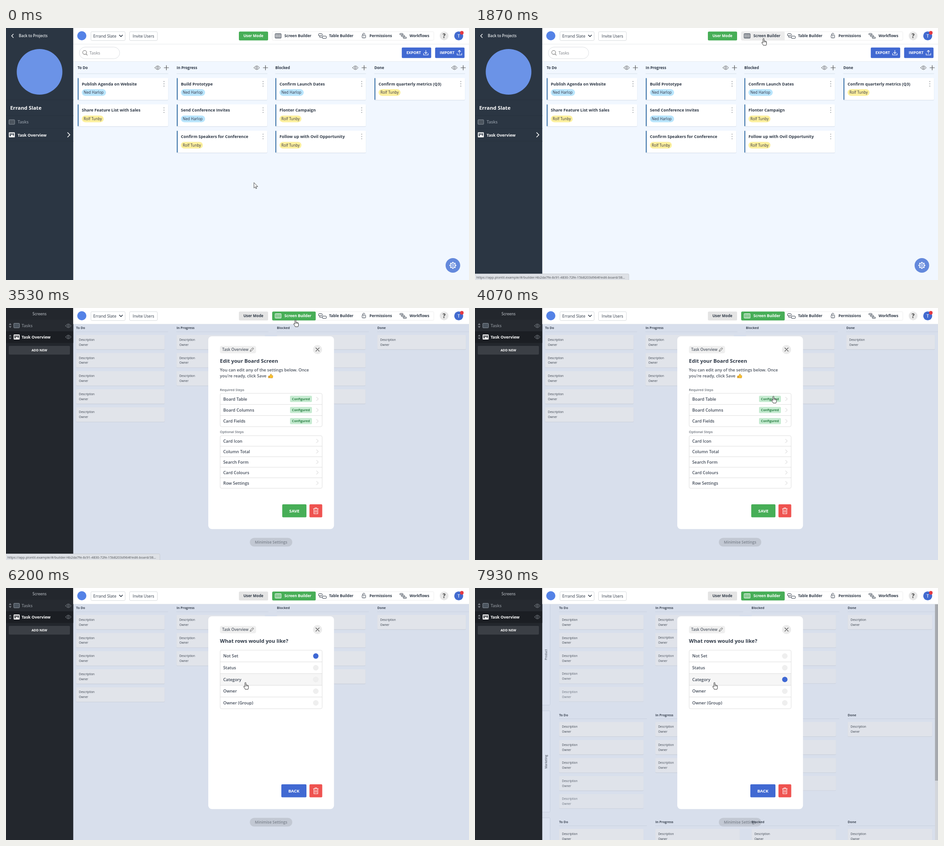
Animation of 1014 by 552 pixels, one loop 8 s. Source, as an HTML page:

```html
<!DOCTYPE html>
<html lang="en">
<head>
<meta charset="utf-8">
<title>Board screen settings</title>
<style>
html, body { margin: 0; width: 100%; height: 100%; overflow: hidden; background: #fff; }
svg { display: block; width: 1014px; height: 552px; font-family: "Open Sans", "Noto Sans", sans-serif; font-weight: 600; }
text { white-space: pre; }
</style>
</head>
<body>
<svg id="stage" viewBox="0 0 1014 552"></svg>
<script>
const LOOP = 8000, APP = 'Errand Slate';
const INK = '#2f3947', BLUE = '#4169d2', GREEN = '#47ae57';
const COLS = ['To Do', 'In Progress', 'Blocked', 'Done'];

// drawing helpers
const rect = (x, y, w, h, fill, r = 0, stroke = 'none', sw = 1) =>
  `<rect x="${x}" y="${y}" width="${w}" height="${h}" rx="${r}" fill="${fill}" stroke="${stroke}" stroke-width="${sw}"/>`;
const circle = (x, y, r, fill, stroke = 'none', sw = 1) =>
  `<circle cx="${x}" cy="${y}" r="${r}" fill="${fill}" stroke="${stroke}" stroke-width="${sw}"/>`;
const line = (d, color, w = 1, fill = 'none') =>
  `<path d="${d}" fill="${fill}" stroke="${color}" stroke-width="${w}" stroke-linecap="round" stroke-linejoin="round"/>`;
const text = (x, y, s, size, fill = INK, weight = 600, anchor = 'start') =>
  `<text x="${x}" y="${y}" font-size="${size}" fill="${fill}" font-weight="${weight}" text-anchor="${anchor}">${s}</text>`;
const group = (id, body) => `<g id="${id}">${body}</g>`;
const at = (x, y, body) => `<g transform="translate(${x} ${y})">${body}</g>`;
const fade = (opacity, body) => `<g opacity="${opacity}">${body}</g>`;
const times = (n, fn) => Array.from({ length: n }, (_, i) => fn(i)).join('');

// icons
const eye = (x, y, c) => at(x, y, line('M-6 0Q0-8.4 6 0Q0 8.4-6 0z', c, 1) + circle(0, 0, 2, 'none', c));
const plus = (x, y) => at(x, y, line('M-5 0H5M0-5V5', '#555', 1.2));
const chevron = (x, y, c, s = 1, w = 1) => at(x, y, line(`M${-s * 2} ${-s * 4}L${s * 2} 0L${-s * 2} ${s * 4}`, c, w));
const tableIcon = (x, y) => rect(x, y, 12.5, 10, '#4b545e', 1, '#87909a');
const boardIcon = (x, y, back) => rect(x, y, 13, 11, '#fff', 1) +
  rect(x + 2, y + 2, 2.2, 6.5, back) + rect(x + 5.4, y + 2, 2.2, 3.6, back) + rect(x + 8.8, y + 2, 2.2, 5.2, back);
const gridIcon = c => rect(589.5, 12.5, 13, 9.5, 'none', 1, c, 1.1) +
  line('M592.2 12.5v9.5M594.8 12.5v9.5M597.4 12.5v9.5M600 12.5v9.5', c, 1);
const tray = (x, up) => at(x, 54, line('M-5 1.5V5H5V1.5', '#fff', 1.1) +
  line(up ? 'M0 2V-5M-2.8-2.4L0-5 2.8-2.4' : 'M0-5V2M-2.8-.6L0 2 2.8-.6', '#fff', 1.1));

function header(build) {
  const c = build ? '#fff' : INK;
  return rect(147.3, 0, 866.7, 35, '#fff') + line('M148 35.3H1014', '#e4e6ea', .8) +
    circle(166, 17, 10, '#5482e6') +
    rect(186, 8, 75, 19.5, '#fff', 2.5, '#d4d7db', .9) + text(191, 21, APP, 8.96, INK, 500) +
    line('M248.5 15.5L251.8 19 255.1 15.5', INK, 1.6) +
    rect(270.5, 8, 61, 19.5, '#fff', 2.5, '#d4d7db', .9) + text(301, 21, 'Invite Users', 8.6, INK, 500, 'middle') +
    rect(510, 7.7, 64, 19.6, build ? '#e4e4e4' : GREEN, 2.5) +
    text(541.8, 20.4, 'User Mode', 8.2, build ? INK : '#fff', 700, 'middle') +
    rect(583, 8, 354, 19, '#fff', 2.5, '#ececec', .9) +
    (build ? rect(583, 7.7, 95.3, 19.6, GREEN, 2.5) : group('navHover', rect(583, 7.7, 95.3, 19.6, '#ececec', 2.5))) +
    gridIcon(c) + text(609.7, 20.4, 'Screen Builder', 8.2, c, 700) +
    rect(684.5, 12.5, 8, 4.5, 'none', 1, INK) + rect(693, 17.8, 8.5, 5, 'none', 1, INK) +
    line('M687 17v3.4h5.5', INK, .9) + text(707.5, 20.4, 'Table Builder', 8.2, INK, 700) +
    rect(780, 15.5, 7.6, 6.2, 'none', 1, INK) + line('M781.3 15.3v-1.6a2.4 2.4 0 0 1 4.7-.6M783.8 18v1.3', INK) +
    text(796, 20.4, 'Permissions', 8.2, INK, 700) +
    rect(862.5, 12, 7, 2.8, 'none', 1, INK) + rect(866, 16, 7, 2.8, 'none', 1, INK) + rect(870, 20, 7, 2.8, 'none', 1, INK) +
    text(883.7, 20.4, 'Workflows', 8.2, INK, 700) +
    circle(959.5, 17.3, 9.6, '#e7e7e7') + text(959.5, 22.2, '?', 13.5, '#444', 700, 'middle') +
    circle(991.5, 17.3, 9.8, '#426bd0') + text(991.5, 20.5, 'T', 8.6, '#fff', 600, 'middle') +
    circle(998.3, 10.5, 3.9, '#e33b43');
}

// user mode
const TAGS = { a: ['Ned Harlop', 53, '#b9e5fc'], b: ['Rolf Tunby', 48, '#fdf09e'] };
const TASKS = [
  [['Publish Agenda on Website', 'a'], ['Share Feature List with Sales', 'b']],
  [['Build Prototype', 'a'], ['Send Conference Invites', 'a'], ['Confirm Speakers for Conference', 'b']],
  [['Confirm Launch Dates', 'a'], ['Flonter Campaign', 'b'], ['Follow up with Ovil Opportunity', 'b']],
  [['Confirm quarterly metrics (Q3)', 'b']]
];

function taskCard([title, key], x, y) {
  const [name, w, color] = TAGS[key];
  return at(x, y,
    fade(.12, rect(0, .8, 198.3, 48.4, '#2c476b', 2)) +
    rect(0, 0, 198, 48, '#fff', 1.5) + rect(0, 0, 2, 48, '#3a72a8', 1) +
    text(9, 16, title, 8.96, INK, 700) +
    times(3, i => circle(189, 7.6 + i * 5, 1.2, '#b3b6ba')) +
    rect(9, 24.4, w, 14.7, color, 7.4) + text(13, 34.7, name, 8.2, '#334', 400));
}

function userView() {
  const back = '#2b3643';
  const side = rect(0, 0, 147.3, 552, back) + line('M16 13.5L12.3 17.3 16 21', '#fff', 1.3) +
    text(28, 20.3, 'Back to Projects', 8.2, '#e9ecef') +
    circle(73.5, 96, 50, '#6b93e7') +
    line('M0 157.5H147M0 192H147M0 220H147M0 248H147', '#27313d', .9) +
    text(9.3, 178.6, APP, 11.26, '#fff', 700) +
    tableIcon(6.5, 201) + text(25.5, 209.3, 'Tasks', 9.2, '#8e97a2') +
    boardIcon(6.3, 228.5, back) + text(25.5, 237.5, 'Task Overview', 8.8, '#fff', 700) + chevron(137.5, 234, '#fff', 1.2, 1.6);
  const bar = rect(147, 35, 867, 38, '#fff') + line('M147 73.3H1014', '#e3e7ee', .8) +
    rect(160.5, 41.8, 88.5, 25.4, '#fff', 12.7, '#d9dce0', .9) +
    circle(172.3, 53.6, 4.3, 'none', '#777', 1.1) + line('M175.5 57L178 59.6', '#777', 1.1) +
    text(182.8, 57.8, 'Tasks', 9.4, '#7b7f85', 400) +
    rect(866.8, 42.8, 64.4, 23, BLUE, 2) + text(877, 57.2, 'EXPORT', 8.2, '#fff', 700) + tray(919.5, false) +
    rect(939.8, 42.8, 64.4, 23, BLUE, 2) + text(950, 57.2, 'IMPORT', 8.2, '#fff', 700) + tray(993, true);
  const board = COLS.map((name, c) => {
    const x = Math.round(157 + c * 216.7);
    return text(x - .3, 90, name, 8.19, INK, 700) + eye(x + 175.2, 87, '#666') + plus(x + 194.3, 87) +
      line(`M${x} 100H${x + 198}`, '#cfd8e4', .8) +
      TASKS[c].map((k, i) => taskCard(k, x, 109.6 + i * 57.7)).join('');
  }).join('');
  const gear = at(978.7, 520, circle(0, 0, 16, '#6489dc') +
    times(8, i => `<rect x="-1.6" y="-7.4" width="3.2" height="3" rx=".8" fill="#fff" transform="rotate(${i * 45})"/>`) +
    circle(0, 0, 5.2, '#6489dc', '#fff', 1.2) + circle(0, 0, 2.2, 'none', '#fff', 1.1));
  return rect(147, 35, 867, 517, '#f1f7ff') + bar + header(false) + side + board + gear;
}

// builder mode
const COUNTS = [5, 3, 4, 1];
const lane = (x0, pitch, w, dy) => COLS.map((name, c) => {
  const x = x0 + c * pitch;
  return text(x, 46.2 + dy, name, 7.17, '#3f4856', 700) + line(`M${x} ${52 + dy}H${x + w + 7}`, '#c6cedd', .8) +
    times(COUNTS[c], i => `<g class="card" data-delay="${c * 30 + i * 75}">` + at(x, 59 + dy + i * 39.65,
      rect(0, .7, w, 32, '#c9d0dc', 2) + rect(0, 0, w, 31.6, '#e1e4ea', 2) +
      text(6.3, 12.9, 'Description', 6.4, '#39414d', 400) + text(6.3, 23.8, 'Owner', 6.4, '#39414d', 400)) + '</g>');
}).join('');

const flatBoard = () => lane(153.5, 219.9, 194, 0);
const rowBoard = () => ['Product', 'Marketing', ''].map((name, r) => {
  const dy = r * 234.4;
  return rect(146, 34.5 + dy, 18.5, 222, '#dce3f0', 2, '#c3ccdc', .8) +
    at(158.4, 146 + dy, `<g transform="rotate(-90)">${text(0, 0, name, 6.4, '#39414d', 400, 'middle')}</g>`) +
    lane(184.2, 210.7, 185, dy);
}).join('') + rect(1007.5, 35, 6.5, 517, '#d3d6db') + rect(1007.5, 35, 6.5, 387, '#a6a9ae');

function list(y, step, names, hoverIndex, hoverId, hoverFill, right) {
  const h = step * names.length;
  return rect(469, y, 223.3, h, '#fff', 3) +
    group(hoverId, rect(469, y + step * hoverIndex, 223.3, step, hoverFill)) +
    rect(469, y, 223.3, h, 'none', 3, '#dcdcdc', .9) +
    names.map((n, i) => {
      const mid = y + step * (i + .5);
      return (i ? line(`M469 ${y + step * i}H692.3`, '#dcdcdc', .9) : '') +
        text(475.8, mid + 3.4, n, 9.2, '#3e4755') + right(mid);
    }).join('');
}
const arrowEnd = mid => chevron(682, mid, '#c4c4c4', .95, .9);
const badge = mid => rect(622, mid - 6.8, 48, 13.6, '#c6ebd1', 2) +
  text(646, mid + 2.6, 'Configured', 7.17, '#2b8045', 700, 'middle') + arrowEnd(mid);
const button = (x, w, label, fill) => rect(x, 430, w, 28.5, fill, 2) +
  text(x + w / 2, 447.7, label, 9.3, '#fff', 700, 'middle');

const thumb = at(574, 143.5, line('M3.3 5.2L6 .8Q8 .6 7.3 4.2H10Q11 5 10.3 6.4Q10.6 8 9.6 9.8H4.6L3.3 9z', '#a9720f', .5, '#fbc02d') +
  line('M.8 5.4H3.2V9.6H.8z', '#a9720f', .5, '#f2a91e'));

function modal() {
  const steps = text(468.6, 119.6, 'Edit your Board Screen', 11.26, INK, 700) +
    text(468.6, 138.8, 'You can edit any of the settings below. Once', 9.2, '#4b535f') +
    text(468.6, 151.6, 'you\'re ready, click Save', 9.2, '#4b535f') + thumb +
    text(468.6, 181.5, 'Required Steps', 7.36, '#666d76') +
    list(187, 24.3, ['Board Table', 'Board Columns', 'Card Fields'], 2, 'fieldHover', '#f0f0f0', badge) +
    text(468.6, 274.4, 'Optional Steps', 7.36, '#666d76') +
    list(279.7, 23.05, ['Card Icon', 'Column Total', 'Search Form', 'Card Colours', 'Row Settings'], 0, 'stepHover', '#f0f0f0', arrowEnd) +
    button(605, 53, 'SAVE', GREEN);
  const rows = text(468.6, 119.6, 'What rows would you like?', 11.26, INK, 700) +
    list(136.2, 25.65, ['Not Set', 'Status', 'Category', 'Owner', 'Owner (Group)'], 0, 'rowHover', '#f6f6f6',
      mid => circle(678.5, mid, 5.6, '#efefef', '#e8e8e8', .6)) +
    group('pick', circle(678.5, 0, 5.9, '#3f68d4')) + button(603, 55, 'BACK', BLUE);
  return rect(443, 62, 275.3, 422.3, '#fff', 8) +
    rect(468.6, 83, 79, 16.3, '#efefef', 4) + text(473.6, 94.2, 'Task Overview', 8.32, '#525a66') +
    line('M534.8 94.6L535.4 92 540.4 87 542.4 89 537.4 94z', '#444', .9) +
    circle(682.3, 91, 10, '#ebebeb') + line('M678.6 87.3L686 94.7M686 87.3L678.6 94.7', '#444', 1.2) +
    group('steps', steps) + group('rows', rows) +
    rect(664.6, 430, 28, 28.5, '#ef5350', 2) +
    at(678.6, 444.2, line('M-5.5-4.5H5.5M-2-4.5V-6.5H2V-4.5M-4.2-4.5V6.5H4.2V-4.5M-1.5-1.5V3.8M1.5-1.5V3.8', '#fff', 1.1));
}

const sorter = y => line(`M6.8 ${y - 1.8}L9.2 ${y - 4.8}L11.6 ${y - 1.8}zM6.8 ${y + 1.8}L9.2 ${y + 4.8}L11.6 ${y + 1.8}z`, '#858a90', .4, '#858a90');

function buildView() {
  const side = rect(0, 0, 147.3, 552, '#23272d') + rect(0, 25.5, 147.3, 25.5, '#262a30') + rect(0, 51, 147.3, 25.5, '#1b1e23') +
    text(73.3, 16, 'Screens', 8.25, '#a9adb3', 600, 'middle') +
    sorter(38.5) + tableIcon(17, 33.5) + text(34.2, 41.8, 'Tasks', 9.2, '#878c93') + eye(136.5, 39, '#7d838a') +
    sorter(63.5) + boardIcon(16.8, 58, '#1b1e23') + text(34.2, 66.8, 'Task Overview', 8.8, '#fff', 700) + eye(136.5, 63.5, '#7d838a') +
    rect(6, 83, 134, 19, '#3b3f45', 2) + text(73, 95.3, 'ADD NEW', 7.17, '#fff', 700, 'middle');
  return rect(147, 35, 867, 517, '#d8dfec') +
    fade(.6, rect(534, 503.5, 93, 19, '#b4bac4', 9.5)) +
    text(580.5, 516.2, 'Minimise Settings', 8.3, '#7b828d', 600, 'middle') +
    group('flat', flatBoard()) + group('laned', rowBoard()) +
    modal() + side + header(true);
}

const url = 'https://app.plontil.example/#/builder/4b2da7fe-6c91-4830-72fe-15b8203d964f/edit-board/38...';
const status = rect(-1, 538.5, 338, 15, '#dee1e6', 2, '#c5c8cd', .8) + text(3, 548.7, url, 7.38, '#4f5358', 400);
const arrow = line('M0 0V11.5L2.6 9 4.4 13 6.1 12.3 4.4 8.4H8z', '#222', .8, '#fff');
const hand = line('M-1.3 9V1.2a1.2 1.2 0 0 1 2.4 0V5.5q1.2-.6 2 .3 1.2-.5 1.8.5 1.5-.3 1.6 1.2V11q0 2-1 4H-.5Q-1.5 12.5-4 9.6q-.4-1.4.9-1.5z', '#222', .9, '#fff') +
  line('M1.1 5.5v2.7M3.1 6v2.2M4.9 6.5v1.8', '#222', .7);

document.getElementById('stage').innerHTML =
  group('user', userView()) + group('build', buildView()) + group('status', status) +
  group('cursor', group('arrow', arrow) + group('hand', hand));

const el = id => document.getElementById(id);
const show = (id, on) => { el(id).style.display = on ? '' : 'none'; };
const clamp = v => Math.max(0, Math.min(1, v));
const smooth = v => v * v * (3 - 2 * v);

// pointer: start, end, x, y reached at end
const MOVES = [
  [0, 0, 543, 339], [530, 1330, 623, 50], [1400, 1870, 632, 23], [2000, 2200, 634, 26],
  [3530, 4330, 660, 248], [4400, 4930, 541, 380], [5730, 6200, 524.5, 207]
];
function pointer(t) {
  let [, , x, y] = MOVES[0];
  for (const [a, b, px, py] of MOVES.slice(1)) {
    if (t < a) break;
    const p = smooth(clamp((t - a) / (b - a)));
    x += (px - x) * p;
    y += (py - y) * p;
  }
  return [x, y];
}

const cards = id => [...el(id).querySelectorAll('.card')].map(node => ({ node, delay: +node.dataset.delay }));
const decks = [[cards('flat'), 1930], [cards('laned'), 7470]];

function draw(t) {
  const build = t >= 2000, rows = t >= 5130, laned = t >= 7470;
  const [x, y] = pointer(t);
  const onNav = x > 583 && x < 678 && y > 8 && y < 27.5;
  const required = build && !rows && y > 187 && y < 260;
  const field = required && y > 235.6;
  const step = build && !rows && y > 279.7 && y < 395 ? Math.floor((y - 279.7) / 23.05) : -1;
  const row = rows && y > 136.2 && y < 264.4 ? Math.floor((y - 136.2) / 25.65) : -1;

  show('user', !build);
  show('build', build);
  show('navHover', onNav);
  show('status', t >= 1600 && t < 3700);
  show('flat', !laned);
  show('laned', laned);
  show('steps', !rows);
  show('rows', rows);
  el('rows').style.opacity = clamp(.4 + (t - 5130) / 330);
  show('fieldHover', field);
  show('stepHover', step >= 0);
  el('stepHover').setAttribute('transform', `translate(0 ${Math.max(0, step) * 23.05})`);
  show('rowHover', row >= 0);
  el('rowHover').setAttribute('transform', `translate(0 ${Math.max(0, row) * 25.65})`);
  el('pick').setAttribute('transform', `translate(0 ${laned ? 200.3 : 149})`);

  for (const [deck, start] of decks) for (const { node, delay } of deck) {
    const p = 1 - (1 - clamp((t - start - delay) / 500)) ** 3;
    node.style.opacity = p;
    node.setAttribute('transform', `translate(0 ${(-2.5 * (1 - p)).toFixed(2)})`);
  }

  const loading = t >= 2000 && t < 2130;
  const pointing = !loading && (onNav || required || step >= 0 || row >= 0);
  show('hand', pointing);
  show('arrow', !pointing);
  el('cursor').setAttribute('transform', `translate(${x.toFixed(2)} ${y.toFixed(2)})`);
}

const begin = performance.now();
function tick() {
  draw((performance.now() - begin) % LOOP);
  requestAnimationFrame(tick);
}
tick();
</script>
</body>
</html>
```
